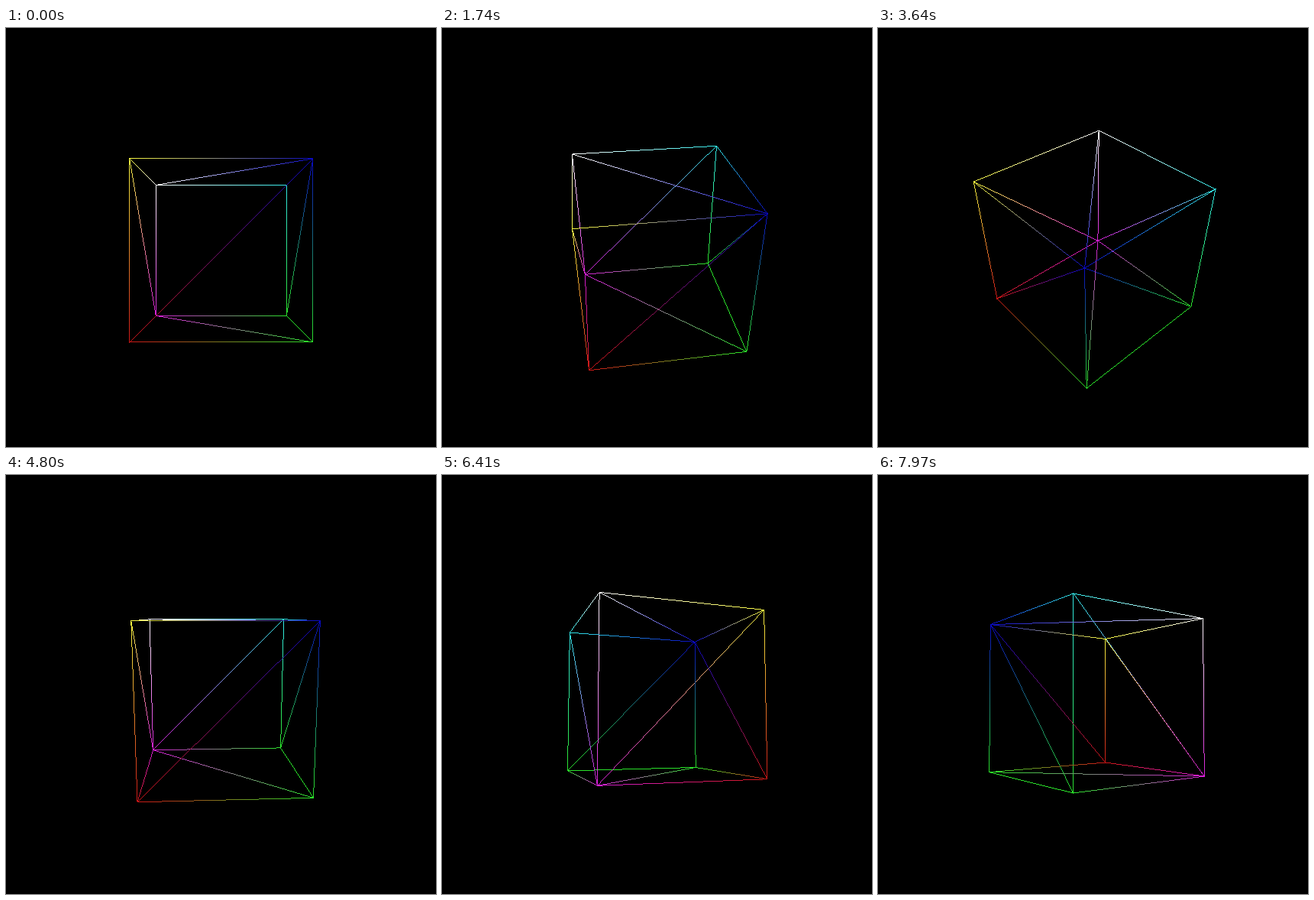
An HTML page with a canvas that plays this animation: 563x548 px, repeating every 8000 ms.

```html
<!DOCTYPE html>
<html lang="en">
<head>
<meta charset="utf-8">
<title>Wireframe cube</title>
<style>
  html, body { margin: 0; width: 100%; height: 100%; overflow: hidden; background: #000; }
  canvas { display: block; }
</style>
</head>
<body>
<canvas id="stage" width="563" height="548"></canvas>
<script>
const LOOP = 8000;
const CENTER = { x: 281.25, y: 290.4 };
const FOCAL = 593;
const DISTANCE = 5.94;
const FADE = 0.28; // how far colours lean towards grey of the same brightness

// The cube turns at one speed while a key is held: [pressed, released] in ms.
const SPEED = 69 / 1000; // degrees per ms
const KEYS = {
  right: [[300, 546], [4052, 5800], [5860, 7300], [7312, LOOP]],
  left: [[1617, 2562]],
  up: [[780, 1261], [2900, 3245], [5950, 5998], [7400, 7439]],
  down: [[3398, 3969], [4200, 4307], [5000, 5264]]
};

// Corner bits: 1 = right, 2 = bottom, 4 = back. Colour bits: 4 = red, 2 = green, 1 = blue.
const CORNERS = [6, 1, 4, 2, 7, 3, 5, 2].map((bits, i) => ({
  position: [i & 1 ? 1 : -1, i & 2 ? -1 : 1, i & 4 ? -1 : 1],
  color: soften([4, 2, 1].map(bit => bits & bit ? 255 : 0))
}));

// Every cube edge, plus the face diagonals that meet in two opposite corners.
const EDGES = [];
for (let i = 7; i > 0; i--) {
  for (let j = i - 1; j >= 0; j--) {
    const differing = [1, 2, 4].filter(bit => (i ^ j) & bit).length;
    const hub = [i, j].some(n => n === 1 || n === 6);
    if (differing === 1 || (differing === 2 && hub)) EDGES.push([i, j]);
  }
}

const canvas = document.getElementById('stage');
const ctx = canvas.getContext('2d');
const image = ctx.createImageData(canvas.width, canvas.height);
const pixels = new Uint32Array(image.data.buffer);

function mix(a, b, k) {
  return a + (b - a) * k;
}

function soften([r, g, b]) {
  const luma = 0.299 * r + 0.587 * g + 0.114 * b;
  return [r, g, b].map(c => mix(c, luma, FADE));
}

function turned(key, time) {
  const held = KEYS[key].reduce((sum, [from, to]) =>
    sum + Math.max(0, Math.min(time, to) - from), 0);
  return held * SPEED * Math.PI / 180;
}

function project([x, y, z], yaw, pitch) {
  const rx = x * Math.cos(yaw) + z * Math.sin(yaw);
  const rz = z * Math.cos(yaw) - x * Math.sin(yaw);
  const ry = y * Math.cos(pitch) - rz * Math.sin(pitch);
  const scale = FOCAL / (DISTANCE - y * Math.sin(pitch) - rz * Math.cos(pitch));
  return [CENTER.x + rx * scale, CENTER.y - ry * scale];
}

// One-pixel line without smoothing, sampled at whole pixels of its longer axis.
function drawLine(p, q, from, to) {
  const axis = Math.abs(q[0] - p[0]) >= Math.abs(q[1] - p[1]) ? 0 : 1;
  const first = Math.round(Math.min(p[axis], q[axis]));
  const last = Math.round(Math.max(p[axis], q[axis]));
  for (let n = first; n <= last; n++) {
    const k = (n - p[axis]) / (q[axis] - p[axis]);
    const side = Math.round(mix(p[1 - axis], q[1 - axis], k));
    const [x, y] = axis === 0 ? [n, side] : [side, n];
    const shade = Math.max(0, Math.min(1, k));
    const [r, g, b] = from.map((c, i) => Math.round(mix(c, to[i], shade)));
    pixels[y * canvas.width + x] = (255 << 24 | b << 16 | g << 8 | r) >>> 0;
  }
}

function render(time) {
  const yaw = turned('right', time) - turned('left', time);
  const pitch = turned('up', time) - turned('down', time);
  const points = CORNERS.map(corner => project(corner.position, yaw, pitch));
  pixels.fill(0xff000000);
  for (const [i, j] of EDGES) {
    drawLine(points[i], points[j], CORNERS[i].color, CORNERS[j].color);
  }
  ctx.putImageData(image, 0, 0);
}

const start = performance.now();
function tick() {
  const time = Math.max(0, performance.now() - start) % LOOP;
  // The motion runs at 30 pictures per second.
  render(Math.floor((time + 4) * 0.03) / 0.03);
  requestAnimationFrame(tick);
}
tick();
</script>
</body>
</html>
```
